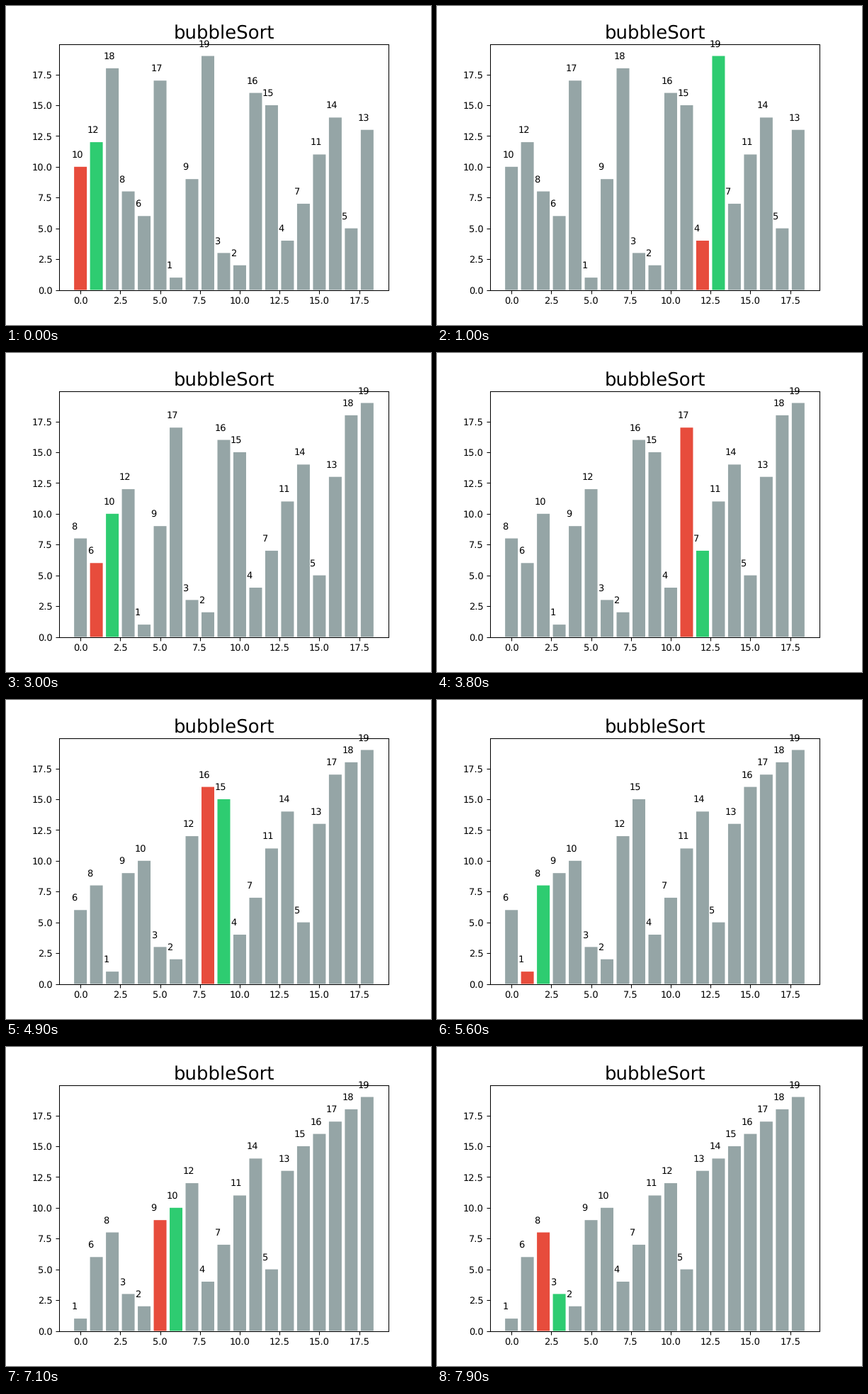
A matplotlib script that plays this animation: 600x450 px, repeating every 8 s.

```python
import matplotlib.pyplot as plt
from matplotlib.animation import FuncAnimation

VALUES = [10, 12, 18, 8, 6, 17, 1, 9, 19, 3, 2, 16, 15, 4, 7, 11, 14, 5, 13]
GRAY, RED, GREEN = "#95a5a6", "#e74c3c", "#2ecc71"
FRAMES, INTERVAL = 80, 100

plt.rcParams["font.family"] = "DejaVu Sans"
plt.rcParams["text.hinting"] = "no_hinting"


def bubble_steps(values):
    """List (values, j) before and after each comparison of j with j + 1."""
    data, steps = list(values), []
    for end in range(len(data) - 1, 0, -1):
        for j in range(end):
            steps.append((data[:], j))
            if data[j] > data[j + 1]:
                data[j], data[j + 1] = data[j + 1], data[j]
            steps.append((data[:], j))
    return steps


STEPS = bubble_steps(VALUES)

fig, ax = plt.subplots(figsize=(6.4, 4.8), dpi=93.75)
ax.set_title("bubbleSort", fontsize=20)
# unsnapped bars keep their exact sub-pixel edges
bars = ax.bar(range(len(VALUES)), VALUES, color=GRAY, linewidth=0, snap=False)
labels = [
    ax.annotate(str(v), xy=(i, v), xytext=(-10, 10), textcoords="offset points")
    for i, v in enumerate(VALUES)
]
ax.set_xlim(ax.get_xlim())
ax.set_ylim(ax.get_ylim())


def update(frame):
    # 24 sort steps per second, shown at 10 frames per second
    values, j = STEPS[(12 * frame + 5) // 5]
    for i, (bar, label, v) in enumerate(zip(bars, labels, values)):
        bar.set_height(v)
        bar.set_facecolor(RED if i == j else GREEN if i == j + 1 else GRAY)
        label.xy = (i, v)
        label.set_text(str(v))
    return [*bars, *labels]


anim = FuncAnimation(fig, update, frames=FRAMES, interval=INTERVAL,
                     init_func=lambda: update(0), repeat=True, blit=False)
plt.show()
```
